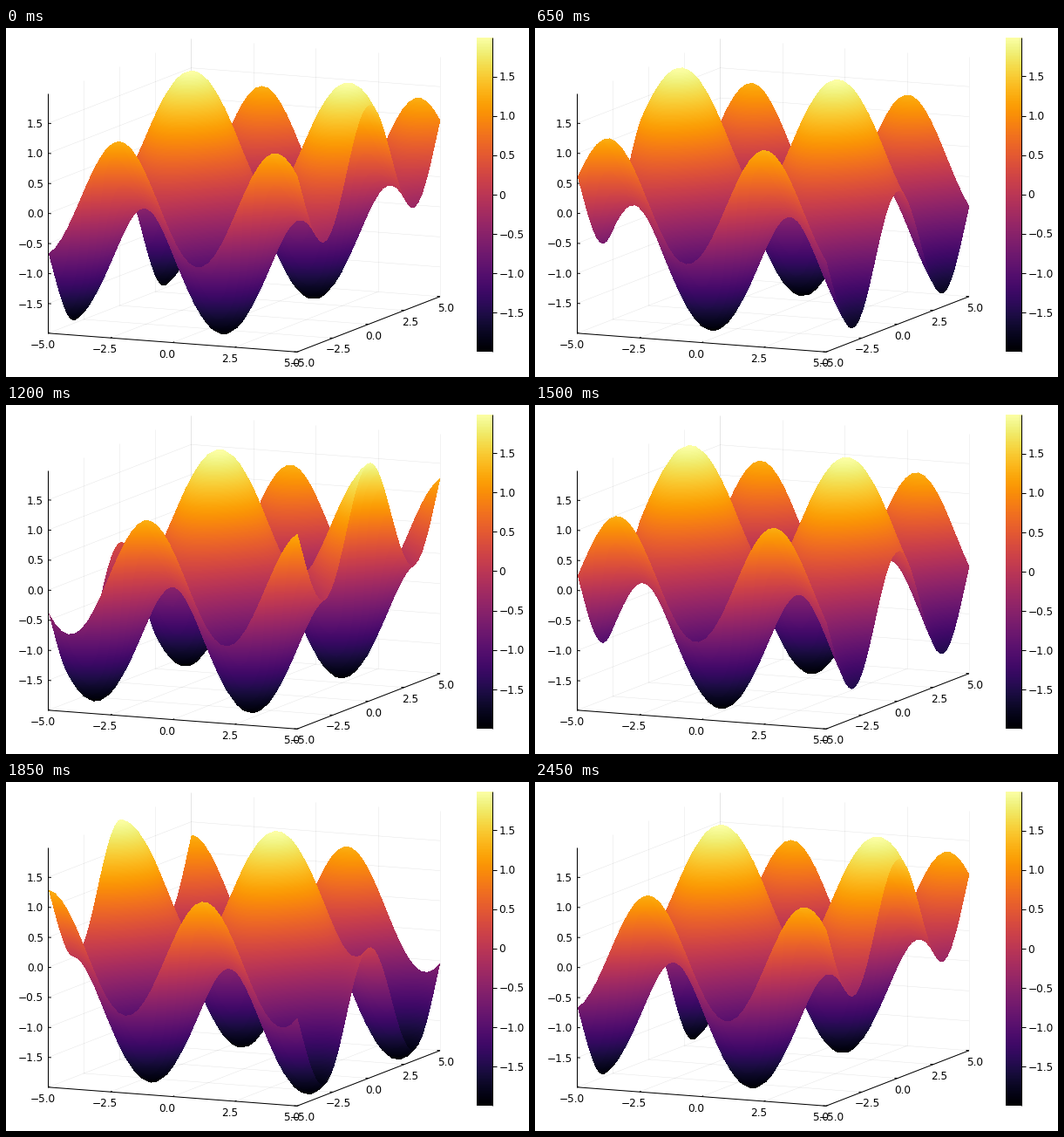
Write a matplotlib script that moves like this. It is 600 px wide and 400 px high and loops after 2500 ms.

```python
import numpy as np
import matplotlib.pyplot as plt
from matplotlib.animation import FuncAnimation
from matplotlib.collections import LineCollection

W, H, DPI = 600, 400, 100
FRAMES, INTERVAL = 50, 50
N = 40

ORIGIN = np.array([48.4, 349.8])     # screen place of (-5, -5, zmin)
X_DIR = np.array([28.55, 2.15])      # pixels per unit of x
Y_DIR = np.array([16.4, -6.35])      # pixels per unit of y
Z_HEIGHT = 274.4
SURFACE_SHIFT = np.array([0.45, -0.4])
BAR_LEFT, BAR_RIGHT, BAR_TOP, BAR_BOTTOM = 540, 558.4, 11.2, 370.8
TICKS = [-5.0, -2.5, 0.0, 2.5, 5.0]
Z_TICKS = np.arange(-1.5, 1.6, 0.5)
PX = 72 / DPI
CMAP = plt.get_cmap("inferno")

axis_values = np.linspace(-5, 5, N)
gx, gy = np.meshgrid(axis_values, axis_values)


def project(x, y, h=0.0):
    """Screen point; h is the height as a share of the z range."""
    sx, sy = (ORIGIN[k] + (x + 5) * X_DIR[k] + (y + 5) * Y_DIR[k] for k in (0, 1))
    return sx, sy - h * Z_HEIGHT


def mesh_triangles():
    """Vertex indices of all triangles, from back to front."""
    tris = []
    for j in range(N - 2, -1, -1):
        for i in range(N - 1):
            a = j * N + i
            tris.append((a, a + N, a + N + 1))
            tris.append((a, a + 1, a + N + 1))
    return np.array(tris)


TRIS = mesh_triangles()


def surface_z(k):
    phase = 10 * np.cos(2 * np.pi * k / (FRAMES - 1))
    return np.sin(gx + phase) + np.cos(gy)


def raster(share):
    """Fill the triangles pixel by pixel, without smoothing of edges."""
    sx, sy = project(gx, gy, share)
    sx, sy = sx + SURFACE_SHIFT[0], sy + SURFACE_SHIFT[1]
    tx, ty, tz = (v.ravel()[TRIS] for v in (sx, sy, share))
    left = np.ceil(tx.min(1) - 0.5).astype(int)
    top = np.ceil(ty.min(1) - 0.5).astype(int)
    cols = left[:, None] + np.arange(int(np.ptp(tx, axis=1).max()) + 2)
    rows = top[:, None] + np.arange(int(np.ptp(ty, axis=1).max()) + 2)

    area = ((tx[:, 1] - tx[:, 0]) * (ty[:, 2] - ty[:, 0])
            - (ty[:, 1] - ty[:, 0]) * (tx[:, 2] - tx[:, 0]))
    area = np.where(np.abs(area) < 1e-9, 1e-9, area)[:, None]
    weights = []
    for k in range(3):
        a, b = (k + 1) % 3, (k + 2) % 3
        x0, y0 = tx[:, a, None], ty[:, a, None]
        dx, dy = tx[:, b, None] - x0, ty[:, b, None] - y0
        down = dx * (rows + 0.5 - y0) / area
        across = dy * (cols + 0.5 - x0) / area
        weights.append(down[:, :, None] - across[:, None, :])

    inside = np.minimum(np.minimum(weights[0], weights[1]), weights[2]) >= -1e-9
    t, r, c = np.nonzero(inside)
    value = sum(w[t, r, c] * tz[t, k] for k, w in enumerate(weights))
    level = np.full((H, W), -1.0)
    level[rows[t, r], cols[t, c]] = np.clip(value, 0, 1)
    image = CMAP(level, bytes=True)
    image[level < 0] = 0
    return image


fig = plt.figure(figsize=(W / DPI, H / DPI), dpi=DPI, facecolor="white")
ax = fig.add_axes([0, 0, 1, 1])
ax.axis("off")


def lines(segments, width, alpha, zorder):
    return ax.add_collection(LineCollection(
        segments, colors=[(0, 0, 0, alpha)], linewidths=width * PX, zorder=zorder))


def label(x, y, text, ha="center"):
    return ax.text(x, y, text, fontsize=8.7, family="DejaVu Sans", color="black",
                   ha=ha, va="center_baseline", zorder=5)


def number(v):
    return f"{v:.1f}".replace("-", "\u2212")


# Fixed grid, axes, ticks and labels of x and y
grid, ticks = [], []
for v in TICKS:
    grid.append([project(v, -5), project(v, 5)])
    grid.append([project(v, 5), project(v, 5, 1)])
    grid.append([project(-5, v), project(5, v)])
    grid.append([project(-5, v), project(-5, v, 1)])
    ticks.append([project(v, -5), project(v, -4.88)])
    ticks.append([project(5, v), project(4.88, v)])
    x, y = project(v, -5)
    label(x - 6.3, y + 12, number(v))
    x, y = project(5, v)
    label(x + 6.3, y + 12, number(v))
lines(grid, 0.5, 0.1, 1)
lines(ticks, 1, 1, 2)
lines([[project(-5, -5), project(-5, -5, 1)]], 1, 1, 2)
lines([[project(-5, -5), project(5, -5)], [project(5, -5), project(5, 5)]], 1, 1, 2)

# Colour bar
ax.imshow(np.linspace(1, 0, 256)[:, None], cmap=CMAP, aspect="auto", zorder=2,
          extent=(BAR_LEFT, BAR_RIGHT, BAR_BOTTOM, BAR_TOP), interpolation="nearest")
lines([[(BAR_RIGHT, BAR_TOP), (BAR_RIGHT, BAR_BOTTOM)]], 1, 1, 3)

# Parts that follow the range of z
z_grid = lines([], 0.5, 0.1, 1)
z_ticks = lines([], 1, 1, 2)
bar_ticks = lines([], 1, 1, 3)
z_labels = [label(43.2, 0, number(v), "right") for v in Z_TICKS]
bar_labels = [label(565.4, 0, number(v) if v else "0", "left") for v in Z_TICKS]
picture = ax.imshow(np.zeros((H, W, 4), np.uint8), extent=(0, W, H, 0),
                    aspect="auto", interpolation="nearest", zorder=4)
ax.set_xlim(0, W)
ax.set_ylim(H, 0)

rendered = {}


def update(k):
    k = min(k, FRAMES - 1 - k)       # the phase runs there and back
    z = surface_z(k)
    low, high = z.min(), z.max()
    if k not in rendered:
        rendered[k] = raster((z - low) / (high - low))
    picture.set_data(rendered[k])

    walls, marks, bar = [], [], []
    for v, z_text, bar_text in zip(Z_TICKS, z_labels, bar_labels):
        h = (v - low) / (high - low)
        walls.append([project(-5, -5, h), project(-5, 5, h), project(5, 5, h)])
        marks.append([project(-5, -5, h), project(-4.88, -5, h)])
        z_text.set_y(project(-5, -5, h)[1] - 0.3)
        y = BAR_BOTTOM - h * (BAR_BOTTOM - BAR_TOP)
        bar.append([(BAR_RIGHT, y), (BAR_RIGHT + 5, y)])
        bar_text.set_y(y - 0.3)
    z_grid.set_segments(walls)
    z_ticks.set_segments(marks)
    bar_ticks.set_segments(bar)
    return [picture, z_grid, z_ticks, bar_ticks, *z_labels, *bar_labels]


anim = FuncAnimation(fig, update, frames=FRAMES, interval=INTERVAL,
                     repeat=True, repeat_delay=0, blit=False)
plt.show()
```
